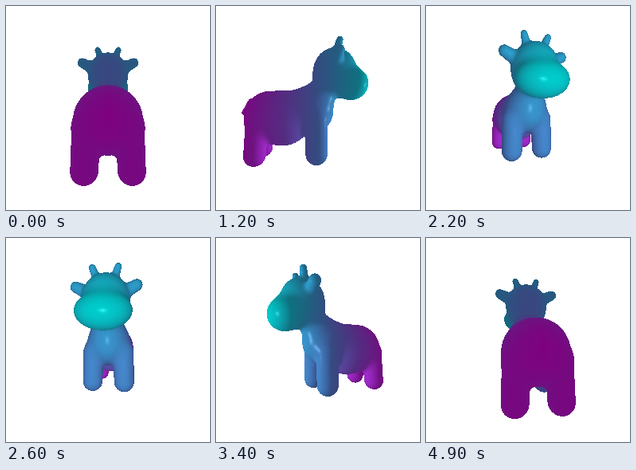
An HTML page with a canvas that plays this animation: 256x256 px, repeating every 5000 ms.

```html
<!DOCTYPE html>
<html lang="en">
<head>
<meta charset="utf-8">
<title>Turning cow</title>
<style>
html, body { margin: 0; width: 100%; height: 100%; overflow: hidden; background: #fff; }
canvas { display: block; width: 100%; height: 100%; }
</style>
</head>
<body>
<canvas id="stage" width="256" height="256"></canvas>
<script>
const SIZE = 256, MID = SIZE / 2;
const STEPS = 50, STEP_MS = 100;
const DIST = 221.7;            // camera distance, equal to the focal length in pixels
const LIGHT = [0, 0, 225];
const NOSE = 62, TAIL = -93;   // ends of the colour ramp

// Axes: x to the side (mirrored), y up, z towards the nose.
const limb = (a, ra, b, rb, k) => {
  const [dx, dy, dz] = b.map((v, i) => v - a[i]);
  const len2 = dx * dx + dy * dy + dz * dz;
  return { k, dist(x, y, z) {
    const px = x - a[0], py = y - a[1], pz = z - a[2];
    const h = Math.min(1, Math.max(0, (px * dx + py * dy + pz * dz) / len2));
    const qx = px - h * dx, qy = py - h * dy, qz = pz - h * dz;
    return Math.sqrt(qx * qx + qy * qy + qz * qz) - ra - h * (rb - ra);
  } };
};
const egg = (c, r, k) => ({ k, dist(x, y, z) {
  const px = (x - c[0]) / r[0], py = (y - c[1]) / r[1], pz = (z - c[2]) / r[2];
  const m = Math.sqrt(px * px + py * py + pz * pz);
  const g = Math.hypot(px / r[0], py / r[1], pz / r[2]) || 1;
  return m < 0.01 ? -Math.min(...r) : m * (m - 1) / g;
} });

const parts = [
  limb([0, -11, -57], 32, [0, -4, -8], 27, 1),         // trunk
  egg([0, -15, -42], [31, 31, 31], 6),                 // belly
  limb([0, 6, -8], 23, [0, 28, 14], 16, 8),            // neck
  limb([19, -18, -70], 12, [20, -53, -72], 12, 7),     // hind leg
  limb([19, -15, -3], 13, [20, -52.5, -3], 12.5, 7),   // front leg
  limb([0, 8, -82], 3.5, [0, -6, -90.5], 2.8, 3),      // tail
  egg([0, 46, 21], [27.5, 29, 27], 4),                 // skull
  egg([0, 37, 18], [23, 23, 23], 6),                   // jaw
  egg([0, 30, 42], [30, 20, 20], 9),                   // muzzle
  limb([22, 55, 19], 8, [35, 61.5, 20], 6.5, 4),       // ear
  limb([10, 69, 22], 5, [14.5, 81, 25], 4, 4)          // horn
];

function field(x, y, z) {
  x = Math.abs(x);
  let d = 1e3;
  for (const p of parts) {
    const e = p.dist(x, y, z);
    const h = Math.max(p.k - Math.abs(d - e), 0);
    d = Math.min(d, e) - h * h / (4 * p.k);
  }
  return d;
}

function gradient([x, y, z]) {
  const e = 0.5;
  const g = [
    field(x + e, y, z) - field(x - e, y, z),
    field(x, y + e, z) - field(x, y - e, z),
    field(x, y, z + e) - field(x, y, z - e)
  ];
  const m = Math.hypot(...g) || 1;
  return g.map(v => v / m);
}

const dot = (a, b) => a[0] * b[0] + a[1] * b[1] + a[2] * b[2];
const toward = (to, from) => {
  const d = to.map((v, i) => v - from[i]), m = Math.hypot(...d);
  return d.map(v => v / m);
};

// Surface mesh: one vertex per crossed grid cell, pulled onto the surface.
const CELL = 2, LOW = [-48, -72, -100], DIM = [49, 83, 86];
const STRIDE = [1, DIM[0], DIM[0] * DIM[1]];
const verts = [], quads = [];

function buildMesh() {
  const total = STRIDE[2] * DIM[2];
  const inside = new Uint8Array(total);
  const ids = new Int32Array(total).fill(-1);
  const at = n => [n % DIM[0], Math.floor(n / STRIDE[1]) % DIM[1], Math.floor(n / STRIDE[2])]
    .map((v, i) => LOW[i] + v * CELL);
  for (let n = 0; n < total; n++) inside[n] = field(...at(n)) < 0 ? 1 : 0;

  const vertex = n => {
    if (ids[n] < 0) {
      let pos = at(n).map(v => v + CELL / 2);
      for (let i = 0; i < 3; i++) {
        const g = gradient(pos), d = field(...pos);
        pos = pos.map((v, j) => v - d * g[j]);
      }
      const normal = gradient(pos), light = toward(LIGHT, pos);
      const nl = dot(normal, light);
      const mix = Math.min(1, Math.max(0, (NOSE - pos[2]) / (NOSE - TAIL)));
      const shade = 0.5 + 0.3 * Math.max(0, nl);
      ids[n] = verts.length;
      verts.push({
        pos, lit: nl > 0,
        mirror: normal.map((v, i) => 2 * nl * v - light[i]),
        base: [mix * shade, (1 - mix) * shade, shade],
        x: 0, y: 0, w: 0, col: [0, 0, 0]
      });
    }
    return ids[n];
  };

  for (let n = 0; n < total - STRIDE[2]; n++) {
    for (let a = 0; a < 3; a++) {
      if (inside[n] === inside[n + STRIDE[a]]) continue;
      const u = STRIDE[(a + 1) % 3], v = STRIDE[(a + 2) % 3];
      quads.push([n, n - u, n - u - v, n - v].map(vertex));
    }
  }
}

const ctx = document.getElementById("stage").getContext("2d");
const image = ctx.createImageData(SIZE, SIZE);
const near = new Float32Array(SIZE * SIZE);

function place(angle) {
  const c = Math.cos(angle), s = Math.sin(angle);
  const eye = [DIST * s, 0, -DIST * c];
  for (const v of verts) {
    const [x, y, z] = v.pos;
    const scale = DIST / (DIST + c * z - s * x);
    v.x = MID + (c * x + s * z) * scale;
    v.y = MID - y * scale;
    v.w = scale;
    const shine = v.lit ? 0.2 * Math.max(0, dot(v.mirror, toward(eye, v.pos))) ** 64 : 0;
    for (let i = 0; i < 3; i++) v.col[i] = 255 * (v.base[i] + shine);
  }
}

function triangle(a, b, c) {
  const area = (b.x - a.x) * (c.y - a.y) - (b.y - a.y) * (c.x - a.x);
  if (Math.abs(area) < 1e-9) return;
  const x0 = Math.max(0, Math.ceil(Math.min(a.x, b.x, c.x) - 0.5));
  const x1 = Math.min(SIZE - 1, Math.floor(Math.max(a.x, b.x, c.x) - 0.5));
  const y0 = Math.max(0, Math.ceil(Math.min(a.y, b.y, c.y) - 0.5));
  const y1 = Math.min(SIZE - 1, Math.floor(Math.max(a.y, b.y, c.y) - 0.5));
  for (let j = y0; j <= y1; j++) {
    for (let i = x0; i <= x1; i++) {
      const px = i + 0.5, py = j + 0.5;
      const s = ((px - a.x) * (c.y - a.y) - (py - a.y) * (c.x - a.x)) / area;
      const t = ((b.x - a.x) * (py - a.y) - (b.y - a.y) * (px - a.x)) / area;
      const r = 1 - s - t;
      if (s < -1e-6 || t < -1e-6 || r < -1e-6) continue;
      const w = r * a.w + s * b.w + t * c.w, n = j * SIZE + i;
      if (w <= near[n]) continue;
      near[n] = w;
      for (let k = 0; k < 3; k++) {
        image.data[n * 4 + k] = r * a.col[k] + s * b.col[k] + t * c.col[k];
      }
    }
  }
}

function draw(step) {
  place(step / STEPS * 2 * Math.PI);
  near.fill(0);
  image.data.fill(255);
  for (const [a, b, c, d] of quads) {
    triangle(verts[a], verts[b], verts[c]);
    triangle(verts[a], verts[c], verts[d]);
  }
  ctx.putImageData(image, 0, 0);
}

buildMesh();
draw(0);

let start = null, shown = 0;
function tick(now) {
  if (start === null) start = now;
  const step = Math.floor(Math.max(0, now - start) / STEP_MS) % STEPS;
  if (step !== shown) draw(shown = step);
  requestAnimationFrame(tick);
}
requestAnimationFrame(tick);
</script>
</body>
</html>
```
